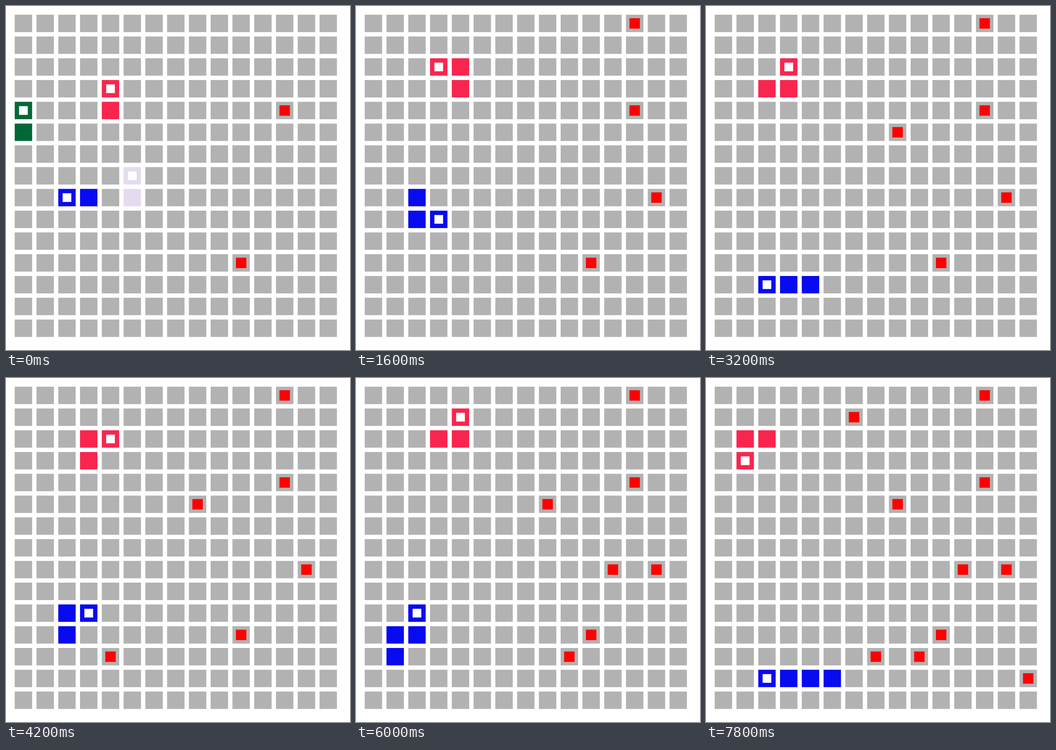
Animation, 748 px wide and 748 px high, one loop 8000 ms. Source, as an HTML page with a canvas:

```html
<!DOCTYPE html>
<html lang="en">
<head>
<meta charset="utf-8">
<title>Snakes on a grid</title>
<style>
  html, body { margin: 0; width: 100%; height: 100%; overflow: hidden; background: #fff; }
  canvas { display: block; width: 748px; height: 748px; }
</style>
</head>
<body>
<canvas id="board" width="748" height="748"></canvas>
<script>
const STEP_MS = 200, STEPS = 40, SIZE = 15;
const PITCH = 50, CELL = 40, MARGIN = 20;
const MOVES = { U: [0, -1], D: [0, 1], L: [-1, 0], R: [1, 0] };

// moves[0] has already been made at step 0; a snake lives for as many steps as it has moves
const snakes = [
  { color: '#006837', start: [0, 5], moves: 'U' },
  { color: '#e4dbee', start: [5, 8], moves: 'UU' },
  { color: '#f8264e', start: [4, 4], moves: 'ULLURDRULDRULLDRURDLURULDRULDRULDLDRULLD' },
  { color: '#080af0', start: [3, 8], moves: 'LLLDRURDRDRDRDLLLLURURDRDLLLURURDRDRDLLL', ateAt: 24 },
];

// column, row, first step, step when eaten
const foods = [
  [12, 4, 0], [10, 11, 0], [12, 0, 2], [13, 8, 3], [8, 5, 15], [4, 12, 18, 24],
  [11, 8, 23], [9, 12, 27], [6, 1, 32], [7, 12, 33], [14, 13, 36],
];

for (const snake of snakes) {
  let [x, y] = snake.start;
  snake.path = [[x, y]];
  for (const move of snake.moves) {
    x += MOVES[move][0];
    y += MOVES[move][1];
    snake.path.push([x, y]);
  }
}

const ctx = document.getElementById('board').getContext('2d');
const scale = 748 / (SIZE * PITCH + 2 * MARGIN);

function square([x, y], size, color) {
  const inset = (CELL - size) / 2;
  ctx.fillStyle = color;
  ctx.fillRect(MARGIN + x * PITCH + inset, MARGIN + y * PITCH + inset, size, size);
}

function draw(step) {
  ctx.setTransform(1, 0, 0, 1, 0, 0);
  ctx.fillStyle = '#fff';
  ctx.fillRect(0, 0, 748, 748);
  ctx.scale(scale, scale);

  const colors = {}, heads = [];
  for (const { path, moves, color, ateAt } of snakes) {
    if (step >= moves.length) continue;
    const length = step > ateAt ? 4 : 3;
    const head = step + 1;
    for (const cell of path.slice(Math.max(0, head + 1 - length), head + 1)) colors[cell] = color;
    heads.push(path[head]);
  }

  for (let y = 0; y < SIZE; y++)
    for (let x = 0; x < SIZE; x++)
      square([x, y], CELL, colors[[x, y]] || '#b2b2b2');

  for (const [x, y, from, until = STEPS] of foods)
    if (step >= from && step < until) square([x, y], 24, '#f00');

  for (const head of heads) square(head, 20, '#fff');
}

const startTime = performance.now();
function frame() {
  const elapsed = performance.now() - startTime;
  draw(Math.floor(elapsed / STEP_MS) % STEPS);
  requestAnimationFrame(frame);
}
frame();
</script>
</body>
</html>
```
